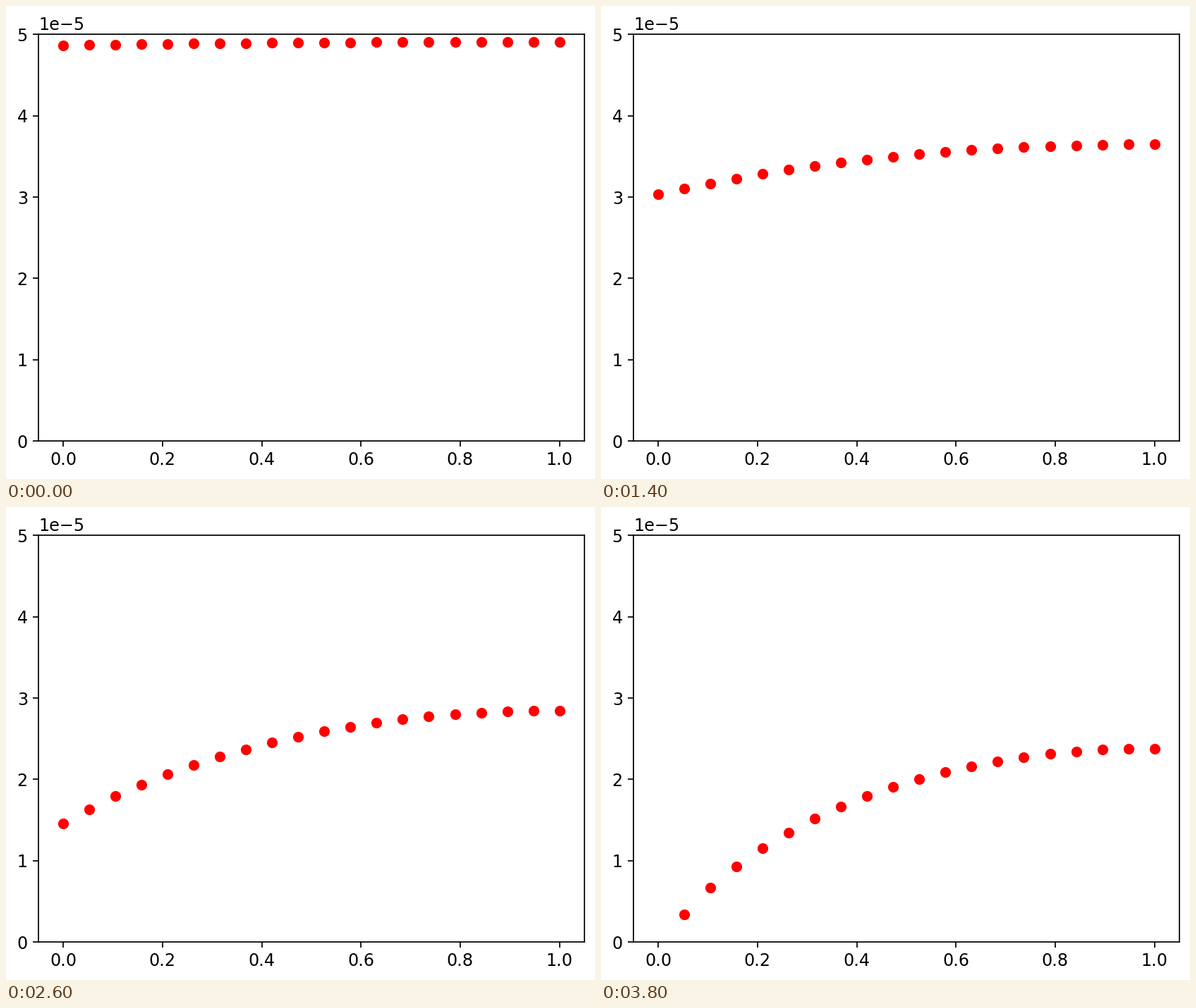
These frames come from a looping animation (835 px wide and 671 px high, 3900 ms). A matplotlib script:

```python
import numpy as np
import matplotlib.pyplot as plt
from matplotlib.animation import FuncAnimation

WIDTH, HEIGHT, DPI = 835, 671, 156
FRAMES, INTERVAL = 39, 100
NODES = 20

START = 5.0        # pore radius at the beginning, in 1e-5
RATE = 0.1312      # radius lost per frame at the open end
UPTAKE = 17.5      # wall uptake relative to diffusion
POWER = 2.08       # how uptake grows as the pore narrows
DIFFUSION = 4.0    # relaxation speed of the concentration, per frame
SUBSTEPS = 20


def step_concentration(conc, radius, dt):
    """Implicit diffusion step: fixed value at x=0, no flux at x=1."""
    h = 1 / (NODES - 1)
    flow = DIFFUSION * dt / h**2
    system = np.eye(NODES)
    for i in range(1, NODES - 1):
        sink = DIFFUSION * dt * UPTAKE / radius[i] ** POWER
        system[i, i - 1:i + 2] = -flow, 1 + 2 * flow + sink, -flow
    system[-1, -2] = -1
    rhs = conc.copy()
    rhs[0], rhs[-1] = 1, 0
    return np.linalg.solve(system, rhs)


def radius_history():
    radius = np.full(NODES, START)
    conc = np.zeros(NODES)
    dt = 1 / SUBSTEPS
    history = []
    for _ in range(FRAMES):
        for _ in range(SUBSTEPS):
            conc = step_concentration(conc, radius, dt)
            radius = radius - RATE * dt * conc
        history.append(radius * 1e-5)
    return history


plt.rcParams["font.family"] = "DejaVu Sans"
plt.rcParams["font.size"] = 11

fig = plt.figure(figsize=((WIDTH + 1e-6) / DPI, (HEIGHT + 1e-6) / DPI),
                 dpi=DPI, facecolor="white")
ax = fig.add_axes([46 / WIDTH, 54 / HEIGHT, 773.76 / WIDTH, 576.58 / HEIGHT])
ax.set_xlim(-0.05, 1.05)
ax.set_ylim(0, 5e-5)

x = np.linspace(0, 1, NODES)
profiles = radius_history()
dots, = ax.plot(x, profiles[0], "ro")


def update(frame):
    dots.set_ydata(profiles[frame])
    return dots,


anim = FuncAnimation(fig, update, frames=FRAMES, interval=INTERVAL,
                     repeat=True, repeat_delay=0, blit=False)
plt.show()
```
